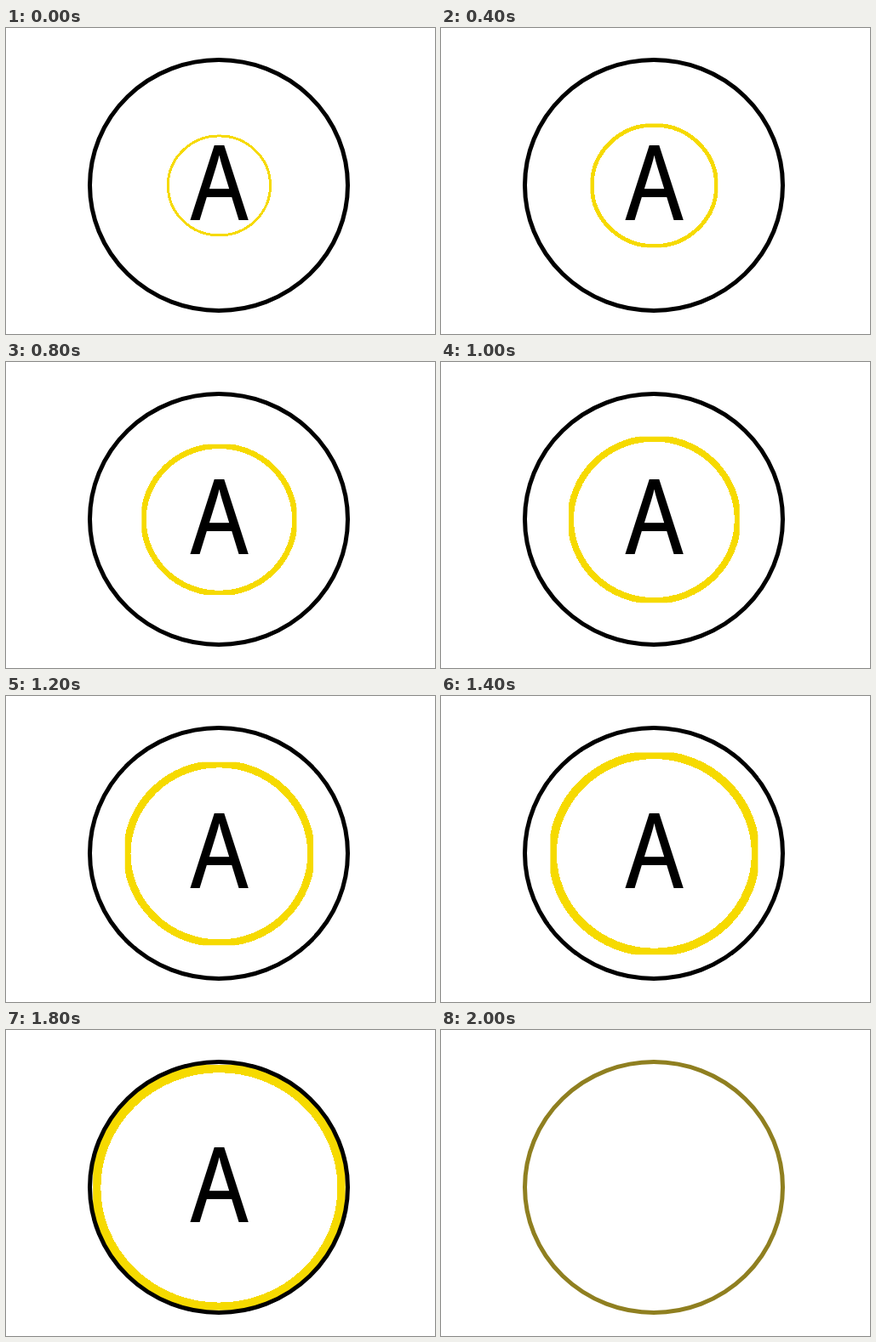
An HTML page that plays this animation: 504x360 px, repeating every 2.5 s.

```html
<!DOCTYPE html>
<html lang="en">
<head>
<meta charset="utf-8">
<title>Closing ring</title>
<style>
  html, body { margin: 0; width: 100%; height: 100%; overflow: hidden; background: #fff; }
  svg { display: block; width: 504px; height: 360px; }
  text { font: 122px "Noto Sans Mono", "DejaVu Sans Mono", monospace; text-anchor: middle; }
</style>
</head>
<body>
<svg viewBox="0 0 504 360">
  <clipPath id="bounds"><rect id="box"/></clipPath>
  <g clip-path="url(#bounds)">
    <ellipse id="pulse" cx="250.4" cy="185.4" fill="none" stroke="#f6da00" shape-rendering="crispEdges"/>
  </g>
  <ellipse id="ring" cx="250" cy="185" rx="151.5" ry="147.5" fill="none" stroke-width="5"/>
  <text id="letter" x="250.5" y="226">A</text>
</svg>
<script>
const LOOP = 2500, STEP = 100, GROWTH = 1.05;
const HIT = 19, CLEAR = 20;
const CX = 250.4, CY = 185.4;
const [box, pulse, ring, letter] =
  ['box', 'pulse', 'ring', 'letter'].map(id => document.getElementById(id));

function set(node, attributes) {
  for (const name in attributes) node.setAttribute(name, attributes[name]);
}

function show(node, on) {
  set(node, { visibility: on ? 'visible' : 'hidden' });
}

function draw(time) {
  const step = Math.floor(time % LOOP / STEP);
  const scale = GROWTH ** step;
  const halfW = 61.6 * scale, halfH = 60 * scale;
  // The stroke thickens and bulges past its box, which cuts the four sides flat.
  const bulge = 0.17 * step;
  const width = 3 * scale + 0.28 * step;

  set(box, { x: CX - halfW, y: CY - halfH, width: 2 * halfW, height: 2 * halfH });
  set(pulse, {
    rx: halfW + bulge - width / 2,
    ry: halfH + bulge - width / 2,
    'stroke-width': width
  });
  set(ring, { stroke: step < HIT ? '#000' : '#8f7f20' });
  show(pulse, step < HIT);
  show(letter, step < CLEAR);
}

const start = performance.now();
function tick() {
  draw(performance.now() - start);
  requestAnimationFrame(tick);
}
tick();
</script>
</body>
</html>
```
